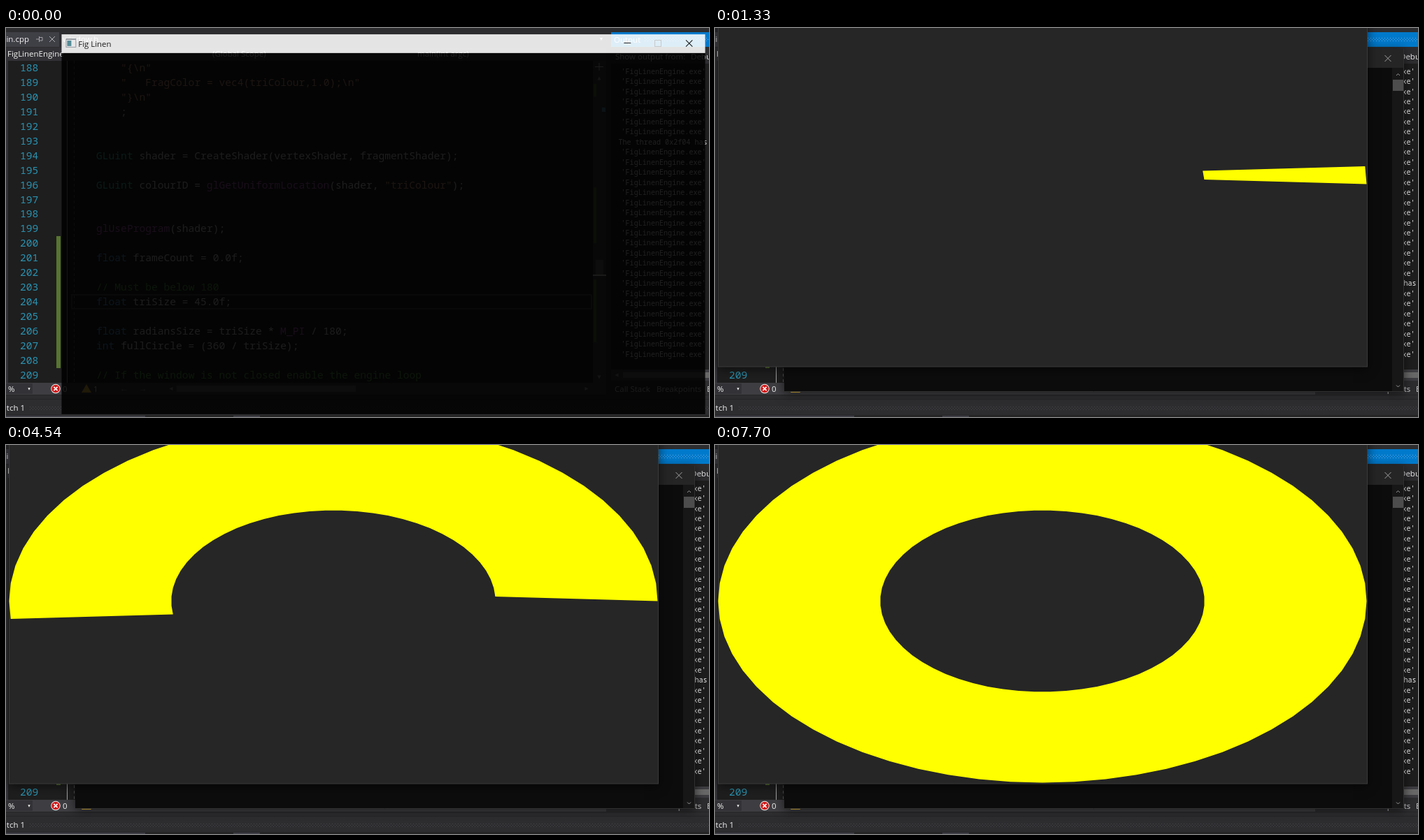
Write an HTML page with a canvas that moves like this. It is 1005 px wide and 557 px high and loops after 8.72 s.

```html
<!DOCTYPE html>
<html lang="en">
<head>
<meta charset="utf-8">
<title>Ring drawing</title>
<style>
html, body { margin: 0; width: 100%; height: 100%; overflow: hidden; background: #2d2d30; }
canvas { display: block; }
</style>
</head>
<body>
<canvas id="stage" width="1005" height="557"></canvas>
<script>
const ctx = document.getElementById('stage').getContext('2d');
const LOOP = 8720, APP = 'Fig Linen', PROJECT = 'FigLinenEngine';
const UI = '"Open Sans", sans-serif', MONO = '"Noto Sans Mono", monospace';
const CHAR = 8.77, LINE = 20.94;

const CODE = {
  188: '    "{\\n"',
  189: '    "   FragColor = vec4(triColour,1.0);\\n"',
  190: '    "}\\n"',
  191: '    ;',
  194: 'GLuint shader = CreateShader(vertexShader, fragmentShader);',
  196: 'GLuint colourID = glGetUniformLocation(shader, "triColour");',
  199: 'glUseProgram(shader);',
  201: 'float frameCount = 0.0f;',
  203: '// Must be below 180',
  204: 'float triSize = 45.0f;',
  206: 'float radiansSize = triSize * M_PI / 180;',
  207: 'int fullCircle = (360 / triSize);',
  209: '// If the window is not closed enable the engine loop'
};

// Runs of even steps: start time, end time, first count, last count
const COARSE = [[110, 510, 2, 6], [680, 790, 7, 8]];
const FINE = [
  [1330, 1330, 1, 1], [1450, 1960, 2, 7], [2060, 2610, 8, 14], [2710, 2920, 15, 17],
  [3010, 3010, 18, 18], [3240, 4060, 20, 28], [4170, 4540, 29, 33], [4720, 5570, 34, 43],
  [5670, 6250, 44, 50], [6440, 7180, 51, 59], [7360, 7700, 60, 64]
];

function countAt(runs, t) {
  let count = 0;
  for (const [from, to, first, last] of runs) {
    if (t < from) break;
    const p = to > from ? Math.min(1, (t - from) / (to - from)) : 1;
    count = Math.floor(first + (last - first) * p + 1e-6);
  }
  return count;
}

function rect(color, x, y, w, h) {
  ctx.fillStyle = color;
  ctx.fillRect(x, y, w, h);
}

// y is the middle of the capitals
function text(str, x, y, color = '#f1f1f1', size = 11.5, font = UI, align = 'left') {
  ctx.font = `${size}px ${font}`;
  ctx.textAlign = align;
  ctx.fillStyle = color;
  ctx.fillText(str, x, y + size * 0.36);
}

function lines(color, width, ...paths) {
  ctx.strokeStyle = color;
  ctx.lineWidth = width;
  ctx.beginPath();
  for (const p of paths)
    for (let i = 0; i < p.length; i += 2) ctx[i ? 'lineTo' : 'moveTo'](p[i], p[i + 1]);
  ctx.stroke();
}

function poly(color, points) {
  ctx.fillStyle = color;
  ctx.beginPath();
  points.forEach(p => ctx.lineTo(...p));
  ctx.fill();
}

function disc(color, x, y, r) {
  ctx.fillStyle = color;
  ctx.beginPath();
  ctx.arc(x, y, r, 0, 7);
  ctx.fill();
}

function cross(x, y, r, color, width = 1) {
  lines(color, width, [x - r, y - r, x + r, y + r], [x - r, y + r, x + r, y - r]);
}

function arrow(x, y, dx, dy, color) {
  poly(color, [[x + dx, y + dy], [x - dx + dy, y - dy + dx], [x - dx - dy, y - dy - dx]]);
}

function dots(x0, x1, y, color) {
  for (let row = 0; row < 3; row++)
    for (let x = x0 + (row % 2) * 2; x < x1; x += 4) rect(color, x, y + row * 2 - 2, 1, 1);
}

function tokenColor(tok) {
  if (tok.startsWith('//')) return '#57a64a';
  if (tok[0] === '"') return '#d69d85';
  if (/^(float|int)$/.test(tok)) return '#569cd6';
  if (tok === 'GLuint') return '#4ec9b0';
  if (/^(gl[A-Z]|M_PI)/.test(tok)) return '#bd63c5';
  return '#dcdcdc';
}

function drawEditor() {
  rect('#2d2d30', 0, 0, 1005, 557);
  rect('#3f3f46', 0, 6, 76, 21);
  text('main.cpp', 33, 16, '#f1f1f1', 11.5, UI, 'right');
  lines('#a0a0a4', 1, [43, 16, 47, 16], [47.5, 12, 47.5, 20], [48, 13.5, 52, 13.5, 52, 18, 48, 18]);
  cross(66, 16, 4, '#b0b0b4');
  text('window.h', 81, 16);
  arrow(851, 16, 0, 2, '#f1f1f1');
  rect('#333337', 0, 28, 858, 19);
  text(PROJECT, 2, 37);
  text('(Global Scope)', 295, 37);
  text('main(int argc)', 588, 37);

  rect('#1e1e1e', 0, 47, 858, 461);
  rect('#333337', 0, 47, 3, 461);
  rect('#577430', 72, 298, 6, 189);
  lines('#a5a5a5', 1, [87.5, 47, 87.5, 508]);
  ctx.setLineDash([4, 4]);
  lines('#5a5a5a', 1, [97.5, 47, 97.5, 508]);
  ctx.setLineDash([]);
  ctx.strokeStyle = '#464646';
  ctx.lineWidth = 2;
  ctx.strokeRect(94, 382, 743, 20);
  for (let n = 188; n <= 209; n++) {
    const y = 56.8 + (n - 188) * LINE;
    text(n, 20, y, '#2b91af', 14.63, MONO);
    for (const m of (CODE[n] || '').matchAll(/\/\/.*|"[^"]*"|\w+|\S/g))
      text(m[0], 129 + m.index * CHAR, y, tokenColor(m[0]), 14.63, MONO);
  }

  rect('#3e3e42', 839, 47, 19, 461);
  lines('#d0d0d0', 1, [842, 55.5, 854, 55.5], [848, 50, 848, 61]);
  arrow(848, 72, 0, -2.5, '#999');
  arrow(848, 500, 0, 2.5, '#999');
  rect('#577430', 840, 80, 4, 18);
  rect('#577430', 840, 228, 4, 80);
  rect('#577430', 840, 360, 4, 90);
  rect('#686868', 843, 332, 11, 22);
  rect('#c8c8c8', 839, 353, 19, 2);
  rect('#5a8aa0', 852, 114, 5, 6);

  rect('#3e3e42', 0, 508, 858, 17);
  rect('#333337', 0, 509, 38, 15);
  text('%', 3, 517);
  arrow(33, 517, 0, 1.7, '#f1f1f1');
  disc('#f1f1f1', 71, 516.5, 6.7);
  disc('#d01818', 71, 516.5, 5.8);
  cross(71, 516.5, 2.6, '#fff', 1.6);
  text('0', 81, 517);
  poly('#f0c040', [[115, 510], [122, 522], [108, 522]]);
  text('1', 125, 517);
  text('←', 163, 516, '#999');
  text('→', 190, 516, '#999');
  arrow(236, 516.5, -2.5, 0, '#999');
  arrow(830, 516.5, 2.5, 0, '#999');
  rect('#686868', 244, 512, 256, 9);

  rect('#252526', 0, 525, 1005, 1);
  rect('#2d2d30', 0, 526, 1005, 31);
  rect('#252528', 0, 531, 1005, 1);
  text('Watch 1', 27, 544, '#f1f1f1', 11.5, UI, 'right');
  dots(34, 1005, 544, '#46464a');
  rect('#252526', 0, 554, 1005, 3);
  rect('#3f3f46', 0, 555, 199, 2);
  rect('#3f3f46', 325, 555, 38, 2);
}

function drawOutput(threadLine) {
  rect('#007acc', 865, 6, 140, 21);
  text('Output', 869, 17, '#fff');
  dots(913, 1005, 16, '#59a8de');
  rect('#2d2d30', 865, 28, 140, 23);
  text('Show output from:', 871, 40.5);
  text('Debug', 979, 40.5);
  rect('#1e1e1e', 865, 51, 140, 438);
  for (let i = 0; i < 29; i++) {
    const y = 62 + i * 14.46;
    if (i === threadLine) text('The thread 0x2f04 has', 875.5, y, '#f1f1f1', 10.1, MONO);
    else text(`'${PROJECT}.exe'`, 879.5, y, '#f1f1f1', 10.1, MONO);
  }
  rect('#3e3e42', 865, 489, 140, 16);
  arrow(873, 497, -2.5, 0, '#999');
  rect('#686868', 882, 493, 123, 8);
  text('Call Stack', 870, 516.5, '#d0d0d0');
  text('Breakpoints', 930, 516.5, '#d0d0d0');
  text('Exception Settings', 1002, 516.5, '#d0d0d0');
}

function shadowBox(color, x, y, w, h) {
  ctx.shadowColor = 'rgba(0,0,0,.6)';
  ctx.shadowBlur = 14;
  ctx.shadowOffsetY = 2;
  rect(color, x, y, w, h);
  ctx.shadowColor = 'transparent';
}

function drawConsole() {
  shadowBox('#0c0c0c', 99, 30, 886, 491);
  rect('#252525', 99, 30, 886, 27);
  cross(962, 43.5, 4.5, '#a0a0a0');
  rect('#171717', 968, 57, 16, 463);
  rect('#4d4d4d', 969, 74, 15, 16);
  lines('#999', 1, [974, 68, 976.5, 65.5, 979, 68], [974, 511.5, 976.5, 514, 979, 511.5]);
  lines('#303030', 1, [984.5, 30, 984.5, 520.5, 99, 520.5]);
}

// Strip of triangles between an outer ring and a half-size ring turned by half a step
function drawRing(sides, count) {
  if (!count) return;
  const at = (i, r) => {
    const a = i * 2 * Math.PI / sides;
    return [539 + 463.5 * r * Math.cos(a), 294 - 260 * r * Math.sin(a)];
  };
  const outer = [], inner = [];
  for (let i = 0; i <= count; i++) {
    outer.push(at(i, 1));
    inner.unshift(at(i + 0.5, 0.5));
  }
  poly('#ff0', outer.concat(inner));
}

function drawApp(dx, dy, opening, sides, count) {
  ctx.save();
  ctx.translate(dx, dy);
  if (opening) {
    ctx.translate(539.5, 281);
    ctx.scale(0.9925, 0.9925);
    ctx.translate(-539.5, -281);
    ctx.globalAlpha = 0.87;
    rect('#000', 76, 34, 927, 521);
  } else {
    shadowBox('#3a3a3a', 75, 7, 929, 549);
    rect('#262626', 76, 34, 927, 521);
  }
  rect('#fff', 76, 7, 927, 27);
  rect('#8a9299', 82, 13, 15, 13);
  rect('#f4f4f4', 83, 15, 13, 10);
  rect('#3f7f8c', 84, 16, 6, 8);
  text(APP, 100, 20.5, '#000');
  lines('#000', 1, [886, 19.5, 896, 19.5]);
  ctx.strokeStyle = '#c4c4c4';
  ctx.strokeRect(930.5, 15.5, 9, 9);
  cross(980, 20, 4.7, '#000', 1.1);
  if (!opening) drawRing(sides, count);
  ctx.restore();
}

function draw(t) {
  const second = t >= 1120;
  drawEditor();
  drawOutput(!second ? 7 : t < 1450 ? 21 : t < 1660 ? 20 : 19);
  if (second) {
    drawConsole();
    drawApp(-71, -70.5, t < 1220, 64, countAt(FINE, t));
  } else {
    drawApp(0, 0, t < 120, 8, countAt(COARSE, t));
  }
}

const start = performance.now();
function tick() {
  draw((performance.now() - start) % LOOP);
  requestAnimationFrame(tick);
}
tick();
</script>
</body>
</html>
```
